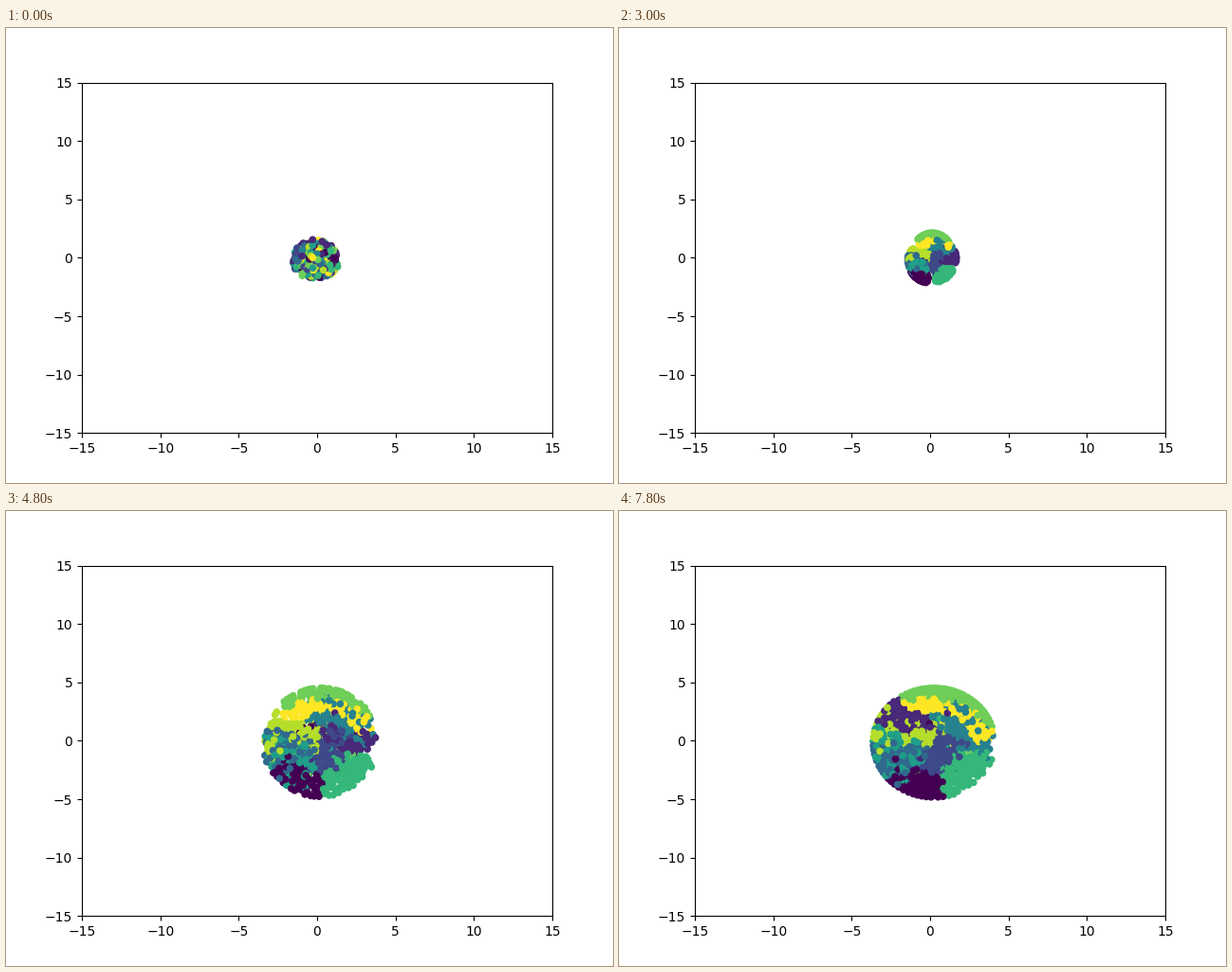
A matplotlib script that plays this animation: 640 by 480 pixels, repeating every 8000 ms.

```python
import numpy as np
import matplotlib.pyplot as plt
from matplotlib.animation import FuncAnimation

rng = np.random.default_rng(7)
COUNT = 960
CLASSES = 10

# Wedge of the disc held by each class:
# first angle, last angle, radius, half width in degrees, half depth.
WEDGES = np.array([
    (234, 252, 0.80, 29, 0.20),
    (3, 142, 0.62, 15, 0.36),
    (328, 290, 0.28, 75, 0.26),
    (195, 206, 0.58, 26, 0.38),
    (60, 35, 0.60, 52, 0.25),
    (218, 202, 0.60, 39, 0.32),
    (308, 313, 0.70, 33, 0.29),
    (84, 69, 0.92, 48, 0.09),
    (174, 163, 0.50, 26, 0.42),
    (81, 64, 0.74, 61, 0.10)])

labels = np.arange(COUNT) % CLASSES
first_angle, last_angle, radius, half_width, half_depth = WEDGES[labels].T
across, along = rng.uniform(-1, 1, (2, COUNT))
delay = rng.uniform(0, 1, COUNT)
is_stray = rng.uniform(0, 1, COUNT) < 0.04
# Points of the unit disc are complex numbers.
disc = np.sqrt(rng.uniform(0, 1, COUNT)) * np.exp(2j * np.pi * rng.uniform(0, 1, COUNT))


def relax(points, reach=0.09, rounds=30):
    """Push close neighbours apart until they fill the unit disc evenly."""
    for _ in range(rounds):
        gaps = points[:, None] - points
        distance = np.abs(gaps) + 1e-9
        push = np.clip(reach / distance - 1, 0, 20) * gaps
        points = points + 0.15 * push.sum(axis=1)
        points = points / np.maximum(1, np.abs(points))
    return points


def layout(angle, half_x):
    points = (radius + half_depth * along) * np.exp(1j * np.radians(angle + half_width * across))
    points = relax(np.where(is_stray, 0.65 * disc, points))
    return np.column_stack([0.24 + half_x * points.real, -0.16 + 4.67 * points.imag])


def class_centres(points):
    return np.array([points[labels == k].mean(axis=0) for k in range(CLASSES)])[labels]


def mixed_start():
    r = rng.beta(2, 2.2, COUNT)
    a = rng.uniform(0, 2 * np.pi, COUNT)
    return np.column_stack([-0.1 + 1.6 * r * np.cos(a), -0.15 + 1.75 * r * np.sin(a)])


spread = layout(first_angle, 3.5)
settled = layout(last_angle, 3.87)

# Early on, each class is a tight clump that has yet to drift into place.
centres = class_centres(spread)
drift = class_centres(settled) - centres
drift *= np.minimum(1, 0.8 / np.linalg.norm(drift, axis=1, keepdims=True))
packed = 0.5 * centres + 0.36 * (spread - centres)
forming = packed - 0.5 * drift

KEYS = [(0, mixed_start()), (5, forming), (10, packed), (12, 1.12 * spread), (14, spread)]
LAST_STEP = 26


def positions(step):
    for (t0, start), (t1, end) in zip(KEYS, KEYS[1:]):
        if step <= t1:
            w = (step - t0) / (t1 - t0)
            if t0 == 0:
                w = w * w * (3 - 2 * w)
            return start + (end - start) * w
    left = (LAST_STEP - step) / (LAST_STEP - KEYS[-1][0])
    w = np.clip(2 * (1 - left**2) - delay, 0, 1)[:, None]
    return spread + (settled - spread) * w


fig, ax = plt.subplots(figsize=(6.4, 4.8), dpi=100)
ax.set_xlim(-15, 15)
ax.set_ylim(-15, 15)
dots = ax.scatter(*positions(0).T, c=labels, cmap="viridis", s=20)


def update(frame):
    dots.set_offsets(positions(frame // 3))
    return (dots,)


anim = FuncAnimation(fig, update, frames=80, interval=100, repeat=True)
plt.show()
```
